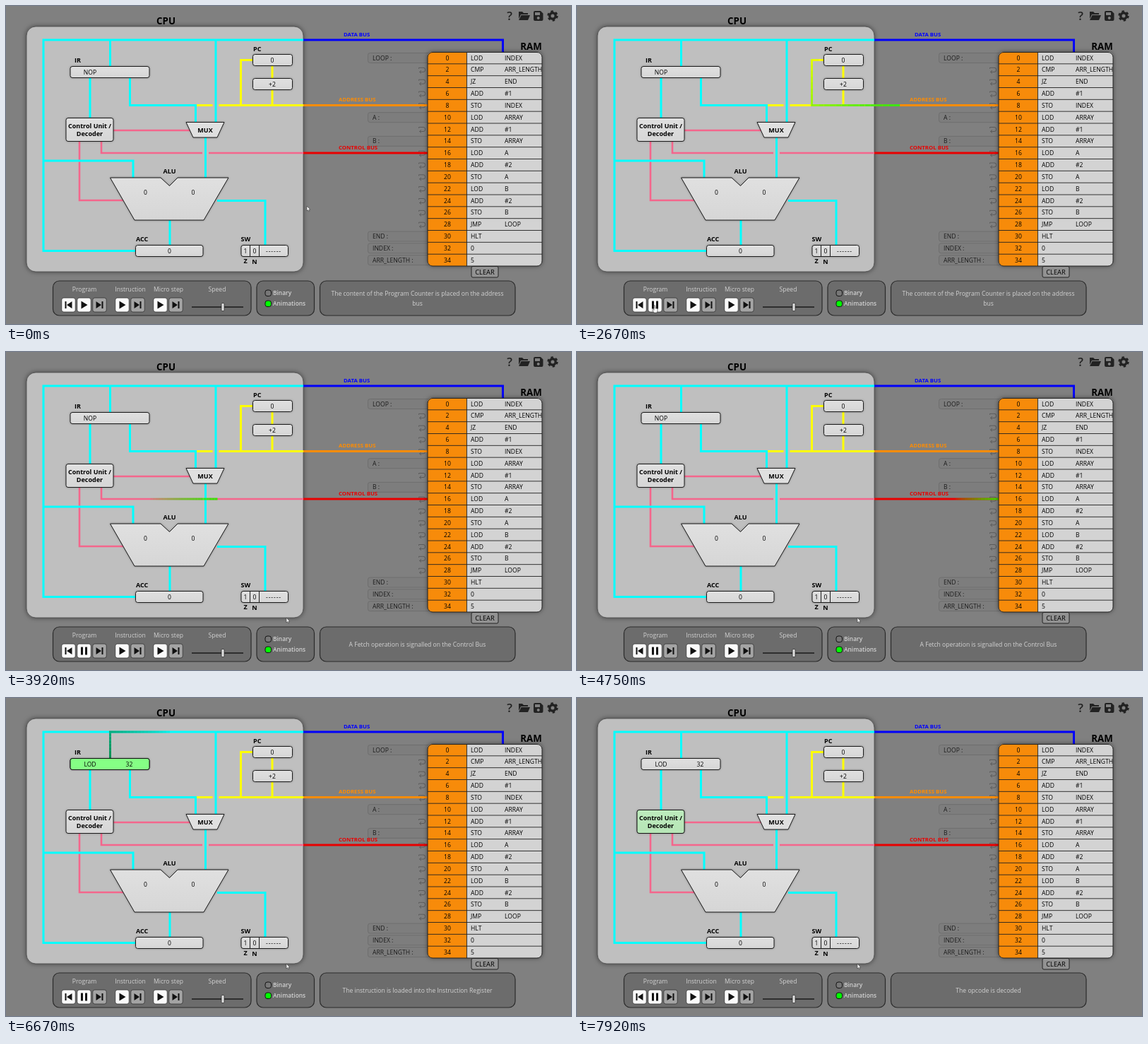
Recreate the animation shown at these times as an HTML page. Size 800x450 px, loop 8000 ms.

```html
<!DOCTYPE html>
<html lang="en">
<head>
<meta charset="utf-8">
<title>CPU simulator</title>
<style>
  html, body { margin: 0; width: 100%; height: 100%; overflow: hidden; background: #808080; }
  svg { display: block; width: 800px; height: 450px; font: 8.6px "Open Sans", "Noto Sans", sans-serif; }
  .wire { fill: none; stroke-width: 3; }
  .cyan { stroke: #0ff; }
  .pink { stroke: #f4668c; stroke-width: 2.6; }
  .yellow { stroke: #ff0; }
  .gap { stroke: #bfbfbf; stroke-width: 9; }
  .box { fill: url(#metal); stroke: #1a1a1a; filter: url(#soft); }
  .b { font-weight: 700; font-size: 9px; }
  .m { text-anchor: middle; }
  .title { font-weight: 700; font-size: 13.3px; }
  .bus { font-weight: 700; font-size: 7.8px; }
  .panel { fill: #6c6c6c; stroke: #2a2a2a; stroke-width: 1.2; }
  .pale { fill: #d2d2d2; }
  .flash { fill: #85ff85; stroke: #111; }
  .icon { fill: #222; }
</style>
</head>
<body>
<svg id="stage" viewBox="0 0 800 450">
  <defs>
    <linearGradient id="metal" x2="0" y2="1">
      <stop stop-color="#e0e0e0"/><stop offset="1" stop-color="#d6d6d6"/>
    </linearGradient>
    <filter id="shadow" x="-10%" y="-10%" width="120%" height="120%">
      <feDropShadow dx="0" dy="0" stdDeviation="3" flood-opacity=".5"/>
    </filter>
    <filter id="soft" x="-5%" y="-5%" width="110%" height="110%">
      <feDropShadow dx="0" dy="0" stdDeviation="1.5" flood-opacity=".3"/>
    </filter>
    <clipPath id="ramClip"><rect x="597" y="65" width="162" height="303" rx="7"/></clipPath>
  </defs>
  <rect width="800" height="450" fill="#808080"/>
  <rect x="29" y="29" width="392" height="347" rx="13" fill="#bfbfbf" stroke="#444" stroke-width=".8" filter="url(#shadow)"/>
  <text class="title m" x="226.500" y="26">CPU</text>
  <text class="title m" x="743.500" y="62">RAM</text>

  <g id="labels"></g>

  <g class="wire">
    <path class="pink" d="M152 176H262M135 191V208H421M104 191V275H168"/>
    <path class="yellow" d="M350 76.500H332.500V140.500M377 84V102M377 118V140.500M268 140.500H421"/>
    <path class="gap" d="M297 134V146M282.500 203V213"/>
    <path class="cyan" d="M421 48H53V346.500H183M147.500 48V85M297 48V165M119 101V158M175.500 101V140.500H268.500V165M53 219H180V243M282.500 186V243M232 303V338M299 275.500H367V338"/>
    <path stroke="#0000fa" d="M421 48H703.500V65"/>
    <path stroke="#ff8c00" d="M421 140.500H597"/>
    <path stroke="#e80000" d="M421 208H597"/>
  </g>
  <text class="bus" x="478" y="43" fill="#00f">DATA BUS</text>
  <text class="bus" x="471" y="135" fill="#ff8c00">ADDRESS BUS</text>
  <text class="bus" x="471" y="202.500" fill="#e80000">CONTROL BUS</text>
  <g id="pulses" class="wire"></g>

  <g class="box">
    <rect x="91" y="85.500" width="112" height="16" rx="3"/>
    <rect x="349.500" y="68.500" width="56" height="16" rx="3"/>
    <rect x="349.500" y="102.500" width="56" height="16" rx="3"/>
    <rect x="85" y="158.500" width="67" height="33" rx="3"/>
    <rect x="183.500" y="338.500" width="95.500" height="16" rx="3"/>
    <rect x="333" y="338.500" width="66.500" height="16" rx="3"/>
    <path d="M345.500 338.500V354.500M358.500 338.500V354.500M255 164.500H309L299 186H265Z"/>
    <path d="M147.500 243H219L231.500 254.500L243 243H315L280 303H182Z"/>
  </g>
  <rect id="irFlash" class="flash" x="91" y="85.500" width="112" height="16" rx="3"/>
  <rect id="cuFlash" class="flash" x="85" y="158.500" width="67" height="33" rx="3"/>
  <g class="b">
    <text x="97" y="80">IR</text><text x="350" y="64">PC</text>
    <text class="m" x="118.500" y="172.500">Control Unit /</text><text class="m" x="118.500" y="184">Decoder</text>
    <text class="m" x="282" y="178.500">MUX</text><text class="m" x="231.500" y="237">ALU</text>
    <text x="184" y="333">ACC</text><text x="332.500" y="333">SW</text>
    <text class="m" x="339" y="364">Z</text><text class="m" x="352" y="365">N</text>
  </g>
  <g class="m">
    <text id="opcode" x="119" y="96.500"></text><text id="operand" x="174.500" y="96.500"></text>
    <text x="377" y="79.800">0</text><text x="377" y="113.800">+2</text>
    <text x="197.500" y="267">0</text><text x="265" y="267">0</text>
    <text x="231.500" y="349.800">0</text>
    <text x="339" y="349.800">1</text><text x="352" y="349.800">0</text>
    <text x="379" y="349.800" letter-spacing=".9">------</text>
  </g>

  <g id="ram"></g>
  <rect x="659" y="368.500" width="38" height="15.500" rx="2" fill="#929292" stroke="#222"/>
  <text class="m" x="678" y="379.500" font-size="9.300">CLEAR</text>

  <g class="icon">
    <text class="m" x="713" y="20" font-size="17" font-weight="600">?</text>
    <path d="M726 8h5l2 2h6v2h-10l-3 6zM729.500 13H742l-3 7H726z"/>
    <path fill-rule="evenodd" d="M747 9q0-2 2-2h8l3.500 3.500V19q0 2-2 2H749q-2 0-2-2zM749 9v4h7V9zM753.700 15a2 2 0 1 0 .1 0z"/>
    <circle cx="774" cy="14" r="4.200" fill="none" stroke="#222" stroke-width="3.400"/>
    <circle cx="774" cy="14" r="6.400" fill="none" stroke="#222" stroke-width="2.600" stroke-dasharray="3.350"/>
  </g>

  <rect class="panel" x="66.500" y="389" width="280.500" height="49" rx="9"/>
  <rect class="panel" x="355" y="389" width="81.500" height="49" rx="9"/>
  <rect class="panel" x="444.500" y="389" width="276.500" height="49" rx="9"/>
  <g class="pale m">
    <text x="111" y="403.500">Program</text><text x="176" y="403.500">Instruction</text>
    <text x="230" y="403.500">Micro step</text><text x="299" y="403.500">Speed</text>
    <text id="line1" x="582.500"></text><text id="line2" x="582.500" y="424.300"></text>
  </g>
  <g id="buttons"></g>
  <path d="M263 426H336" stroke="#1a1a1a" stroke-width="1.500"/>
  <rect x="305" y="420.500" width="4" height="11" rx="1" fill="#ddd" stroke="#222" stroke-width=".7"/>
  <rect x="367" y="402" width="8.500" height="8.500" rx="3" fill="#777" stroke="#111"/>
  <rect x="367" y="417" width="8.500" height="8.500" rx="3" fill="#0f0" stroke="#111"/>
  <g class="pale" font-weight="600" font-size="8.400">
    <text x="378" y="408.800">Binary</text><text x="378" y="423.800">Animations</text>
  </g>

  <g id="cursor" stroke="#333" stroke-width=".6" fill="#fff">
    <path id="arrow" d="M0 0V7L1.600 5.600L2.800 8L3.900 7.500L2.800 5.200H4.800Z"/>
    <path id="hand" d="M-1 0q1-1 1.700 0V3.500L4 4.500V7.500L3 10H-1L-3.500 6L-2.500 5.300L-1 6.500Z"/>
  </g>
</svg>
<script>
const LOOP = 8000;
const $ = id => document.getElementById(id);
const clamp = x => Math.min(1, Math.max(0, x));
const ramp = (t, from, to) => clamp((t - from) / (to - from));
const ease = x => (1 - Math.cos(Math.PI * x)) / 2;
const mix = (a, b, k) => a + (b - a) * k;

function buildRam() {
  const program = `LOD INDEX,CMP ARR_LENGTH,JZ END,ADD #1,STO INDEX,LOD ARRAY,ADD #1,STO ARRAY,LOD A,
ADD #2,STO A,LOD B,ADD #2,STO B,JMP LOOP,HLT,0,5`.split(/,\s*/);
  const names = { 0: 'LOOP', 5: 'A', 7: 'B', 15: 'END', 16: 'INDEX', 17: 'ARR_LENGTH' };
  const rowHeight = 303 / program.length;
  let cells = '', lines = '', labels = '';
  program.forEach((code, i) => {
    const top = 65 + i * rowHeight, base = top + 11.5;
    const [op, arg = ''] = code.split(' ');
    cells += `<text class="m" x="625" y="${base}">${i * 2}</text>
      <text x="658" y="${base}">${op}</text><text x="706" y="${base}">${arg}</text>`;
    if (i) lines += `M597 ${top}H759`;
    labels += names[i]
      ? `<rect x="512.500" y="${top + 1.5}" width="88" height="14" rx="3" fill="#7d7d7d" stroke="#6e6e6e"/>
         <text x="519" y="${base}" fill="#1c1c1c">${names[i]} :</text>`
      : `<path transform="translate(589 ${top + 8.5})" fill="none" stroke="#5c5c5c"
          d="M-4.500-1.500V-3H2Q4.500-3 4.500-.5V.5Q4.500 3 2 3H-3.500M-1 .8L-3.500 3L-1 5.200"/>`;
  });
  $('labels').innerHTML = labels;
  $('ram').innerHTML = `
    <rect x="597" y="65" width="162" height="303" rx="7" fill="#d3d3d3" filter="url(#shadow)"/>
    <g clip-path="url(#ramClip)">
    <rect x="597" y="65" width="55" height="303" fill="#f78b0a"/>
    <path d="${lines}M652.500 65V368" stroke="#222" stroke-width=".9"/>${cells}</g>
    <rect x="597" y="65.500" width="162" height="302.500" rx="7" fill="none" stroke="#222"/>`;
}

function buildButtons() {
  const shapes = {
    back: 'M-5-5h2V5h-2zM5-5V5L-2.500 0z',
    play: 'M-4-5.500V5.500L5 0z',
    next: 'M5-5h-2V5h2zM-5-5V5L2.500 0z'
  };
  const row = [[79, 'back'], [101, 'play'], [123, 'next'], [155, 'play'], [177, 'next'], [209, 'play'], [231, 'next']];
  $('buttons').innerHTML = row.map(([x, kind]) =>
    `<g transform="translate(${x + 9.5} 423)">
      <rect x="-9.750" y="-10" width="19.500" height="20" rx="3" fill="${kind === 'next' ? '#a4a4a4' : '#fafafa'}" stroke="#333" stroke-width=".8"/>
      <path d="${shapes[kind]}" ${x === 101 ? 'id="runIcon"' : ''} fill="#111"/></g>`).join('');
  return shapes;
}

// head and tail: [start time, duration]
const pulses = [
  { d: 'M349 76.500H332.500V140.500H597', head: [1830, 1500], tail: [2600, 800], color: () => '#3ce614' },
  { d: 'M135 191V208H597', head: [3330, 1400], tail: [3446, 1700], color: () => '#32e600' },
  { d: 'M703.500 65V48H147.500V85', head: [5012, 1500], tail: [5140, 2170],
    color: t => { const k = ramp(t, 5900, 6600); return `rgb(10,${mix(235, 145, k)},${mix(40, 85, k)})`; } }
];
const PIECES = 24;

function buildPulses() {
  for (const p of pulses) {
    p.parts = Array.from({ length: PIECES }, () => {
      const path = document.createElementNS('http://www.w3.org/2000/svg', 'path');
      path.setAttribute('d', p.d);
      return $('pulses').appendChild(path);
    });
    p.length = p.parts[0].getTotalLength();
  }
}

function drawPulse(p, t) {
  const at = ([start, span]) => ease(ramp(t, start, start + span)) * p.length;
  const head = at(p.head), tail = at(p.tail), step = (head - tail) / PIECES;
  p.parts.forEach((path, i) => {
    const visible = step > 0.02;
    path.style.display = visible ? '' : 'none';
    if (!visible) return;
    path.setAttribute('stroke', p.color(t));
    path.setAttribute('stroke-opacity', ((i + 1) / PIECES) ** 0.7);
    path.setAttribute('stroke-dasharray', `0 ${tail + i * step} ${step} 9999`);
  });
}

const messages = [
  [0, 'The content of the Program Counter is placed on the address', 'bus'],
  [3430, 'A Fetch operation is signalled on the Control Bus'],
  [4960, 'The instruction is loaded into the Instruction Register'],
  [7460, 'The opcode is decoded']
];

function drawCursor(t) {
  const go = ease(ramp(t, 250, 1050)), leave = ease(ramp(t, 3150, 3750));
  const x = mix(mix(426, 110, go), 397, leave);
  const y = mix(mix(283, 424, go), 376, leave);
  const pointing = y > 413 && x < 145;
  $('cursor').setAttribute('transform', `translate(${x} ${y})`);
  $('arrow').style.display = pointing ? 'none' : '';
  $('hand').style.display = pointing ? '' : 'none';
}

buildRam();
const shapes = buildButtons();
buildPulses();

function draw(t) {
  pulses.forEach(p => drawPulse(p, t));
  drawCursor(t);
  const [, first, second = ''] = messages.filter(m => t >= m[0]).pop();
  $('line1').textContent = first;
  $('line1').setAttribute('y', second ? 410.3 : 416.8);
  $('line2').textContent = second;
  $('runIcon').setAttribute('d', t < 1250 ? shapes.play : 'M-4.500-5.500h3V5.500h-3zM1.500-5.500h3V5.500h-3z');
  const loaded = t >= 6480;
  $('opcode').textContent = loaded ? 'LOD' : 'NOP';
  $('operand').textContent = loaded ? '32' : '';
  $('irFlash').style.opacity = ramp(t, 6450, 6600) * (1 - ramp(t, 6750, 7400));
  $('cuFlash').style.opacity = ramp(t, 7540, 8540);
}

const began = performance.now();
function frame() {
  draw((performance.now() - began) % LOOP);
  requestAnimationFrame(frame);
}
frame();
</script>
</body>
</html>
```
